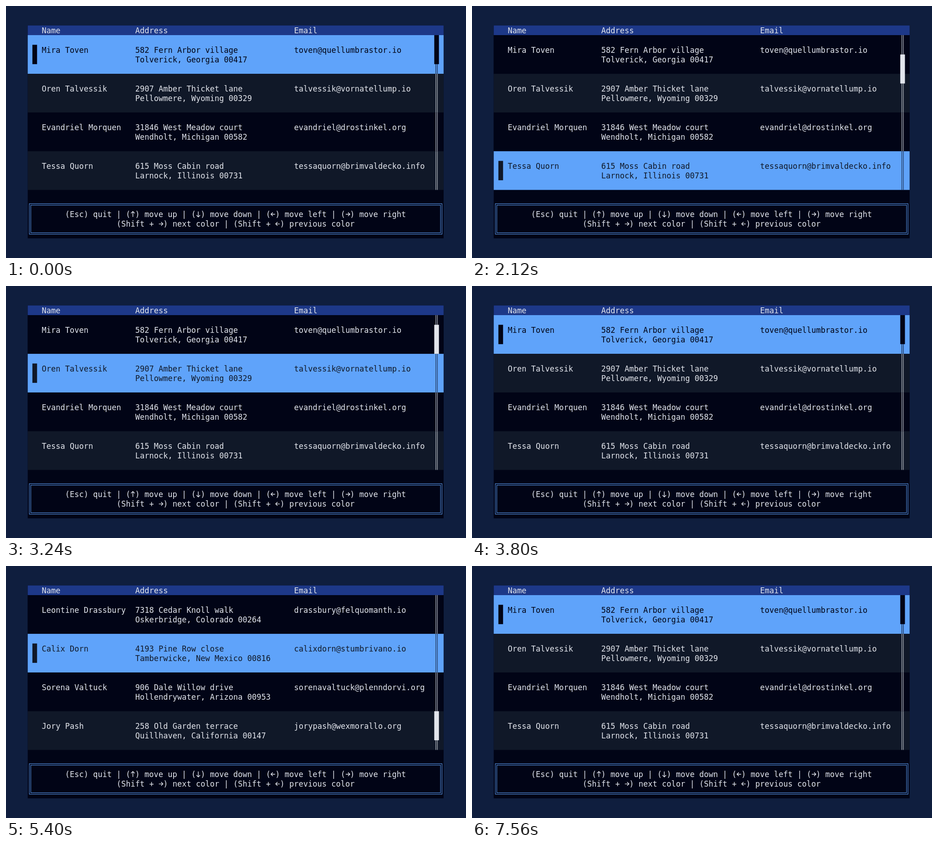
Animation, 1010 px wide and 554 px high, one loop 8 s. Source, as an HTML page with a canvas:

```html
<!DOCTYPE html>
<html lang="en">
<head>
<meta charset="utf-8">
<title>Table browser</title>
<style>
  html, body { margin: 0; width: 100%; height: 100%; overflow: hidden; background: #0f1e3e; }
  canvas { display: block; }
</style>
</head>
<body>
<canvas id="stage" width="1010" height="554"></canvas>
<script>
const ctx = document.getElementById('stage').getContext('2d');

const LOOP = 8000;
const LEFT = 47.7, TOP = 42.75, CELL_W = 10.26, CELL_H = 21.27;
const COLS = 89, SCROLL_COL = 87, RULE_GAP = 1.65;
const DARK = '#010416', ALT = '#101828', TEXT = '#e2e5ec', ACCENT = '#5fa3fa';

// Each record: name, street, town, email
const firstPage = [
  ['Mira Toven', '582 Fern Arbor village', 'Tolverick, Georgia 00417', 'toven@quellumbrastor.io'],
  ['Oren Talvessik', '2907 Amber Thicket lane', 'Pellowmere, Wyoming 00329', 'talvessik@vornatellump.io'],
  ['Evandriel Morquen', '31846 West Meadow court', 'Wendholt, Michigan 00582', 'evandriel@drostinkel.org'],
  ['Tessa Quorn', '615 Moss Cabin road', 'Larnock, Illinois 00731', 'tessaquorn@brimvaldecko.info'],
];
const lastPage = [
  ['Leontine Drassbury', '7318 Cedar Knoll walk', 'Oskerbridge, Colorado 00264', 'drassbury@felquomanth.io'],
  ['Calix Dorn', '4193 Pine Row close', 'Tamberwicke, New Mexico 00816', 'calixdorn@stumbrivano.io'],
  ['Sorena Valtuck', '906 Dale Willow drive', 'Hollendrywater, Arizona 00953', 'sorenavaltuck@plenndorvi.org'],
  ['Jory Pash', '258 Old Garden terrace', 'Quillhaven, California 00147', 'jorypash@wexmorallo.org'],
];

// Scroll thumb per selected row: [first line, line count]
const firstThumbs = [[1, 3], [2, 3], [2, 3], [3, 3]];
const lastThumbs = [null, [13, 3], [14, 2], [14, 3]];

// Key presses: [time, selected row, on last page]
const steps = [
  [0, 0], [1080, 1], [1560, 2], [2120, 3], [2680, 2], [3240, 1], [3800, 0],
  [4360, 3, true], [4840, 2, true], [5400, 1, true], [6480, 2, true], [7000, 3, true],
  [7560, 0],
];

const arrowTurns = { '→': 0, '↓': 1, '←': 2, '↑': 3 };

const cellX = col => LEFT + col * CELL_W;
const cellY = line => TOP + line * CELL_H;

function fillCells(color, col, line, cols, lines) {
  ctx.fillStyle = color;
  ctx.fillRect(cellX(col), cellY(line), cols * CELL_W, lines * CELL_H);
}

function write(text, col, line, color) {
  ctx.fillStyle = color;
  ctx.fillText(text, cellX(col), cellY(line) + 17.3);
}

function drawArrow(turns, col, line) {
  ctx.save();
  ctx.translate(cellX(col + 0.5), cellY(line + 0.5) + 0.3);
  ctx.rotate(turns * Math.PI / 2);
  const reach = turns % 2 ? 6 : 4.5;
  ctx.strokeStyle = TEXT;
  ctx.lineWidth = 1.4;
  ctx.beginPath();
  ctx.moveTo(-reach, 0);
  ctx.lineTo(reach, 0);
  ctx.moveTo(reach - 4, -4);
  ctx.lineTo(reach, 0);
  ctx.lineTo(reach - 4, 4);
  ctx.stroke();
  ctx.restore();
}

function writeHint(text, col, line) {
  write(text.replace(/[→↓←↑]/g, ' '), col, line, TEXT);
  [...text].forEach((char, i) => {
    if (char in arrowTurns) drawArrow(arrowTurns[char], col + i, line);
  });
}

function drawRow(record, row, selected) {
  const line = 1 + row * 4;
  const base = row % 2 ? ALT : DARK;
  const ink = selected ? base : TEXT;
  const [name, street, town, email] = record;
  fillCells(selected ? ACCENT : base, 0, line, COLS, 4);
  if (selected) fillCells(ink, 1, line + 1, 1, 2);
  write(name, 3, line + 1, ink);
  write(street, 23, line + 1, ink);
  write(town, 23, line + 2, ink);
  write(email, 57, line + 1, ink);
  ctx.fillStyle = ink;
  for (const side of [-1, 1]) {
    const x = cellX(SCROLL_COL + 0.5) + side * RULE_GAP;
    ctx.fillRect(x - 0.5, cellY(line), 1, 4 * CELL_H);
  }
}

function drawFooter() {
  ctx.strokeStyle = ACCENT;
  ctx.lineWidth = 1;
  const x = cellX(0.5), y = cellY(18.5);
  for (const gap of [-RULE_GAP, RULE_GAP]) {
    ctx.strokeRect(x + gap, y + gap, 88 * CELL_W - 2 * gap, 3 * CELL_H - 2 * gap);
  }
  writeHint('(Esc) quit | (↑) move up | (↓) move down | (←) move left | (→) move right', 8, 19);
  writeHint('(Shift + →) next color | (Shift + ←) previous color', 19, 20);
}

function draw(time) {
  const [, selected, atEnd] = steps.findLast(step => step[0] <= time);
  ctx.fillStyle = '#0f1e3e';
  ctx.fillRect(0, 0, 1010, 554);
  ctx.font = '17.05px "DejaVu Sans Mono", monospace';

  fillCells(DARK, 0, 0, COLS, 22);
  fillCells('#1d3888', 0, 0, COLS, 1);
  write('Name', 3, 0, TEXT);
  write('Address', 23, 0, TEXT);
  write('Email', 57, 0, TEXT);

  (atEnd ? lastPage : firstPage).forEach((record, row) => drawRow(record, row, row === selected));

  const [line, size] = (atEnd ? lastThumbs : firstThumbs)[selected];
  const row = Math.floor((line - 1) / 4);
  const thumbColor = row === selected ? (row % 2 ? ALT : DARK) : TEXT;
  fillCells(thumbColor, SCROLL_COL, line, 1, size);

  drawFooter();
}

function tick() {
  draw(performance.now() % LOOP);
  requestAnimationFrame(tick);
}
tick();
</script>
</body>
</html>
```
